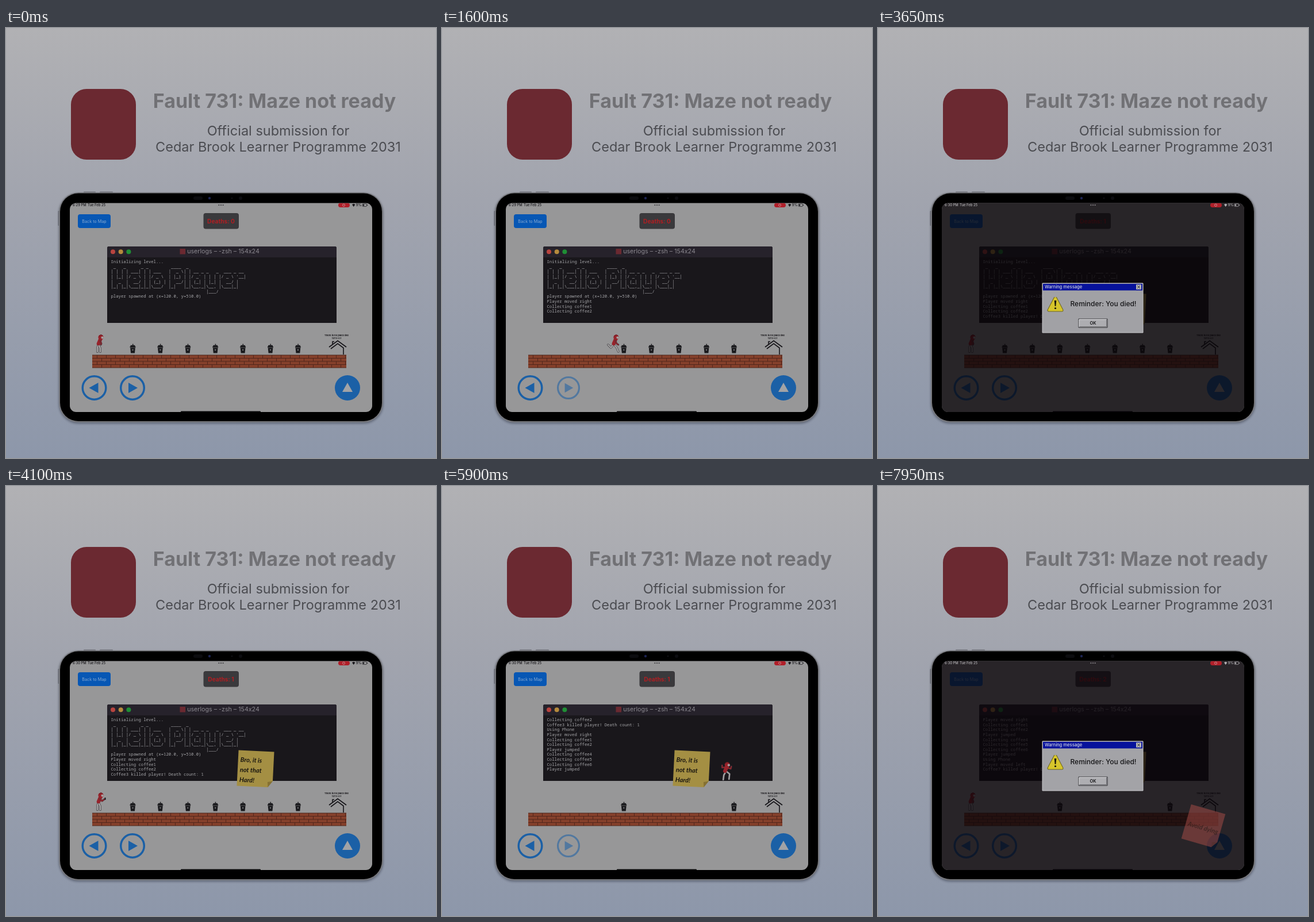
These frames come from a looping animation (748 by 748 pixels, 8000 ms). An HTML page with a canvas:

```html
<!DOCTYPE html>
<html lang="en">
<head>
<meta charset="utf-8">
<style>
html, body { margin: 0; width: 100%; height: 100%; overflow: hidden; background: #a0a3ae; }
canvas { display: block; }
</style>
</head>
<body>
<canvas id="stage" width="748" height="748"></canvas>
<script>
const c = document.getElementById('stage').getContext('2d');
const LOOP = 8000, START_X = 163, SPEED = 0.186, GROUND = 565;
const SANS = 'Inter, Roboto, sans-serif', MONO = '"Noto Sans Mono", "DejaVu Sans Mono", monospace';
const BLUE = '#1b60a6', INK = '#161519';

// [time, line]
const LOG = [
  [0, 'Initializing level...'],
  [0, ' _   _      _ _         ____  _'],
  [0, '| | | | ___| | | ___   |  _ \\| | __ _ _   _  ___ _ __'],
  [0, "| |_| |/ _ \\ | |/ _ \\  | |_) | |/ _` | | | |/ _ \\ '__|"],
  [0, '|  _  |  __/ | | (_) | |  __/| | (_| | |_| |  __/ |'],
  [0, '|_| |_|\\___|_|_|\\___/  |_|   |_|\\__,_|\\__, |\\___|_|'],
  [0, '                                      |___/'],
  [0, 'player spawned at (x=120.0, y=510.0)'],
  [900, 'Player moved right'],
  [1150, 'Collecting coffee1'],
  [1400, 'Collecting coffee2'],
  [1680, 'Coffee3 killed player! Death count: 1'],
  [4150, 'Using Phone'],
  [4850, 'Player moved right'],
  [4900, 'Collecting coffee1'],
  [4950, 'Collecting coffee2'],
  [5000, 'Player jumped'],
  [5200, 'Collecting coffee4'],
  [5450, 'Collecting coffee5'],
  [5700, 'Collecting coffee6'],
  [5800, 'Player jumped'],
  [6680, 'Using Phone'],
  [6930, 'Player moved left'],
  [7160, 'Coffee7 killed player! Death count: 2']
];

const between = (t, a, b) => t >= a && t < b;
const ramp = (t, a, b) => Math.min(1, Math.max(0, (t - a) / (b - a)));

function box(x, y, w, h, r, fill, stroke, lw = 1) {
  c.beginPath();
  c.roundRect(x, y, w, h, r);
  if (fill) { c.fillStyle = fill; c.fill(); }
  if (stroke) { c.strokeStyle = stroke; c.lineWidth = lw; c.stroke(); }
}
function disc(x, y, r, fill) {
  c.beginPath();
  c.arc(x, y, r, 0, 7);
  c.fillStyle = fill;
  c.fill();
}
function poly(points, fill) {
  c.beginPath();
  points.forEach(p => c.lineTo(...p));
  c.closePath();
  c.fillStyle = fill;
  c.fill();
}
function line(points, color, lw) {
  c.beginPath();
  points.forEach(p => c.lineTo(...p));
  c.strokeStyle = color;
  c.lineWidth = lw;
  c.stroke();
}
function text(s, x, y, font, color, align = 'center') {
  c.font = font;
  c.fillStyle = color;
  c.textAlign = align;
  c.fillText(s, x, y);
}
function at(x, y, angle, scale, draw) {
  c.save();
  c.translate(x, y);
  c.rotate(angle);
  c.scale(scale, Math.abs(scale));
  draw();
  c.restore();
}

function backdrop() {
  const g = c.createLinearGradient(0, 0, 0, 748);
  g.addColorStop(0, '#b1b1b4');
  g.addColorStop(0.4, '#a1a4ae');
  g.addColorStop(1, '#8d97aa');
  c.fillStyle = g;
  c.fillRect(0, 0, 748, 748);
  box(113, 106, 113, 123, 27, '#6b2931');
  text('Fault 731: Maze not ready', 467, 139, `700 34px ${SANS}`, '#717175');
  text('Official submission for', 473.5, 187, `400 23.5px ${SANS}`, '#4b4c51');
  text('Cedar Brook Learner Programme 2031', 473.5, 215, `400 23.5px ${SANS}`, '#4b4c51');
}

function tablet() {
  box(135, 284.5, 21, 3, 1, '#75777e');
  box(163, 284.5, 23, 3, 1, '#75777e');
  box(90.5, 318, 3, 26, 1, '#75777e');
  c.save();
  c.shadowColor = 'rgba(40,45,60,.5)';
  c.shadowBlur = 4;
  c.shadowOffsetY = 2;
  box(92, 286, 564, 400, 34, '#77787d');
  c.restore();
  box(94, 287.5, 560, 396.5, 32, '#000');
  box(326, 293, 16, 6, 3, '#0c0c0f');
  disc(354, 296, 2.2, '#1c2352');
  disc(393, 296, 1.3, '#121217');
  disc(408, 296, 3, '#0c0c10');
}

function terminal(t) {
  box(176, 380, 399, 133, [3, 3, 0, 0], '#19171b');
  box(176, 380, 399, 19, [3, 3, 0, 0], '#26222b');
  ['#b8443f', '#b58a3c', '#1f8f35'].forEach((color, i) => disc(186 + 13.7 * i, 389.3, 4, color));
  box(302.5, 384, 9.5, 9.5, 0, '#6b2931');
  text('userlogs – -zsh – 154x24', 378, 392, `400 10.7px ${SANS}`, '#8b888f');
  const n = LOG.filter(l => t >= l[0]).length;
  const top = n < 14 ? Math.max(0, n - 12) : n - 11;
  LOG.slice(top, n).forEach((l, i) =>
    text(l[1], 182.5, 409 + 8.63 * i, `400 7.27px ${MONO}`, '#a6a6a9', 'left'));
}

function wall() {
  c.fillStyle = '#85402b';
  c.fillRect(150, 569, 442, 22);
  c.fillStyle = '#4c241b';
  c.fillRect(150, 568.5, 442, 1);
  for (let row = 0; row < 4; row++) {
    const y = 569 + row * 5.5;
    c.fillRect(150, y + 5, 442, 0.9);
    for (let x = 158 + (row % 2) * 8; x < 592; x += 16) c.fillRect(x, y, 0.9, 5.5);
  }
}

function house() {
  text('There is no place like', 575, 536.3, `700 4.1px ${SANS}`, INK);
  text('127.0.0.1', 575, 541, `700 4px ${SANS}`, INK);
  line([[562, 555], [577, 544], [592, 555]], INK, 1.8);
  line([[565, 558], [577, 549], [587, 556.5], [587, 568]], INK, 1.6);
  line([[568, 550], [568, 545.5], [571, 545.5]], INK, 1.6);
}

function coffee(x) {
  c.fillStyle = '#1a1a1d';
  c.fillRect(x - 0.5, 549.5, 1.4, 3);
  box(x - 4, 551.8, 8, 2.5, 1, '#1a1a1d');
  box(x - 5, 553.8, 10, 2, 0.6, '#1a1a1d');
  poly([[x - 4.4, 556.3], [x + 4.4, 556.3], [x + 3.4, 565.5], [x - 3.4, 565.5]], '#1a1a1d');
  disc(x, 560, 1.2, '#77777a');
}

function limb(points, color, lw) {
  line(points, '#37343a', lw + 1.2);
  line(points, color, lw);
}

function player(x, y, pose, t, dir) {
  const red = '#97232b', pale = '#a5a3a3';
  const s = Math.sin((t - 1500) / 400 * 2 * Math.PI);
  const leg = k => [[-2, -15], [-2 - 5 * k, -9], [-3 - 9 * k, -2 - Math.max(0, 12 * k)]];
  at(x, y, 0, dir, () => {
    c.lineCap = c.lineJoin = 'round';
    if (pose === 'run') {
      limb(leg(s), pale, 2.2);
      limb(leg(-s), pale, 2.2);
    } else if (pose === 'jump') {
      limb([[0, -16], [-4, -9], [-5, -1]], pale, 2.4);
      limb([[1, -15], [6, -11], [5, -2]], pale, 2.4);
      limb([[0, -23], [-7, -22], [-7, -26]], red, 1.8);
      limb([[2, -22], [8, -20], [9, -24]], red, 1.8);
    } else {
      limb([[-3, -14], [-4, -7], [-4, -2]], pale, 2.6);
      limb([[-2, -14], [1, -8], [1, -2]], pale, 2.6);
    }
    line([[1, -23], [-2, -16]], red, 6.5);
    if (pose === 'phone') {
      limb([[0, -21], [4, -17], [8, -20]], red, 1.8);
      box(8.5, -23, 2, 4, 0.5, INK);
    } else if (pose !== 'jump') {
      limb([[1, -21], [3, -16], [pose === 'run' ? 6 : 2, -14]], red, 1.6);
    }
    disc(2, -27, 4.6, red);
    disc(4.6, -26.4, 2.1, pale);
    line([[-1, -29], [2, -31.5], [5, -30]], '#5a151b', 0.8);
    c.lineCap = 'butt';
    c.lineJoin = 'miter';
  });
}

function note(x, y, angle, fill, lines, size) {
  at(x, y, angle, 1, () => {
    poly([[-31, -31], [31, -31], [31, 20], [23, 31], [-31, 31]], fill);
    poly([[31, 20], [23, 31], [22, 22]], 'rgba(60,40,10,.3)');
    lines.forEach((s, i) =>
      text(s, -27, -11 + 17.5 * i, `italic 700 ${size}px Lato, ${SANS}`, '#17140f', 'left'));
  });
}

function control(x, angle, filled, pressed) {
  c.save();
  c.globalAlpha = pressed ? 0.55 : 1;
  at(x, 626, 0, pressed ? 0.91 : 1, () => {
    if (filled) disc(0, 0, 22, BLUE);
    else {
      c.beginPath();
      c.arc(0, 0, 20.3, 0, 7);
      c.strokeStyle = BLUE;
      c.lineWidth = 3.5;
      c.stroke();
    }
    c.rotate(angle);
    poly([[9, 0], [-7, -9], [-7, 9]], filled ? '#a2a3a6' : BLUE);
  });
  c.restore();
}

function status(t, dim) {
  const color = dim > 0.5 ? '#b5b3b6' : INK;
  text(t < 3650 ? '6:29 PM' : '6:30 PM', 116, 310.3, `500 5.9px ${SANS}`, color, 'left');
  text('Tue Feb 25', 142, 310.3, `500 5.9px ${SANS}`, color, 'left');
  for (let i = -1; i < 2; i++) disc(374 + i * 3.6, 308, 1.1, dim > 0.5 ? '#8b888d' : '#3c3b3f');
  box(578, 304.5, 20, 7.5, 3.7, '#b01f29');
  c.beginPath();
  c.arc(587.5, 308.2, 2, 0, 7);
  c.strokeStyle = '#c9a9ab';
  c.lineWidth = 0.8;
  c.stroke();
  poly([[602, 307], [604.7, 305.7], [607.4, 307], [604.7, 311]], color);
  text('9%', 613.5, 310.3, `500 6px ${SANS}`, color);
  box(620, 305.8, 7.5, 4.6, 1.2, null, color, 0.7);
  c.fillStyle = color;
  c.fillRect(621, 306.8, 2, 2.6);
  c.fillRect(628.3, 307.2, 0.8, 1.8);
}

function popup() {
  box(286, 444, 175, 86, 0, '#a3a3a7', '#c9c9cc');
  c.fillStyle = '#07129c';
  c.fillRect(287, 445, 173, 11.5);
  text('Warning message', 290, 453.4, `500 7.6px ${SANS}`, '#d5d6e2', 'left');
  box(449, 446.2, 9, 8.5, 0, '#b5b5b8');
  line([[451.3, 448.2], [455.7, 452.8]], '#111', 1);
  line([[455.7, 448.2], [451.3, 452.8]], '#111', 1);
  c.lineJoin = 'round';
  line([[308.5, 469], [297, 491], [320, 491], [308.5, 469]], '#6d651d', 5);
  poly([[308.5, 468], [296, 492], [321, 492]], '#d6c52b');
  line([[308.5, 469], [297, 491], [320, 491], [308.5, 469]], '#d6c52b', 3);
  c.lineJoin = 'miter';
  poly([[306.7, 474], [310.3, 474], [309.3, 484], [307.7, 484]], '#16140a');
  disc(308.5, 487.5, 1.6, '#16140a');
  text('Reminder: You died!', 392, 484, `500 12px ${SANS}`, '#141416');
  box(349, 506, 50, 15, 0, '#aeaeb2', '#2c2c30');
  line([[350, 520], [350, 507], [398, 507]], '#dcdcdf', 1);
  line([[350.5, 519.6], [397.6, 519.6], [397.6, 507]], '#6b6b70', 1);
  text('OK', 374, 516.2, `600 7.5px ${SANS}`, '#141416');
}

function pose(t) {
  let x = START_X, kind = 'idle', dir = 1, lift = 0;
  const right = between(t, 860, 1670) || between(t, 4120, 6220);
  const left = between(t, 6900, 7130);
  if (right) x += (t - (t < 4000 ? 860 : 4120)) * SPEED;
  else if (between(t, 6220, 7130)) x = 553.6 - Math.max(0, t - 6900) * SPEED;
  if (right || left) kind = 'run';
  else if (between(t, 4000, 4120) || between(t, 6500, 6900)) kind = 'phone';
  if (left) dir = -1;
  for (const start of [4714, 5700]) {
    const u = (t - start) / 520;
    if (u > 0 && u < 1) {
      lift = 56 * 4 * u * (1 - u);
      kind = 'jump';
    }
  }
  return { x, kind, dir, lift, right, left };
}

function taken(i, t) {
  if (i === 2 || i === 6) return false;
  const reach = (208 + 48 * i - START_X) / SPEED;
  return t < 3650 ? i < 2 && t > 860 + reach : t > 4120 + reach;
}

function draw(t) {
  const p = pose(t);
  const dim = t < 5000 ? ramp(t, 1660, 1860) * (1 - ramp(t, 3650, 3800)) : ramp(t, 7150, 7400);
  const deaths = t < 1680 ? 0 : t < 7150 ? 1 : 2;

  backdrop();
  tablet();
  c.save();
  box(111, 304.5, 526, 363.5, 11, '#979798');
  c.clip();

  box(125, 324, 57, 24, 4, '#0757b4');
  text('Back to Map', 153.5, 338.6, `400 7.2px ${SANS}`, '#8aabd2');
  box(343.5, 322, 61.5, 27.5, 4, '#3a393c');
  text('Deaths: ' + deaths, 374, 339.6, `700 10.2px ${SANS}`, '#b11e22');
  terminal(t);
  wall();
  house();
  for (let i = 0; i < 7; i++) if (!taken(i, t)) coffee(220.5 + 47.9 * i);
  c.globalAlpha = ramp(t, 1900, 2200);
  note(434, 492, 0.05, '#a48f43', ['Bro, it is', 'not that', 'Hard!'], 11);
  c.globalAlpha = 1;
  player(p.x, GROUND - p.lift, p.kind, t, p.dir);
  control(153.5, Math.PI, false, p.left);
  control(220, 0, false, p.right);
  control(594, -Math.PI / 2, true, between(t, 4700, 4860) || between(t, 5690, 5850));
  box(304, 666.4, 139, 3, 1, '#0b0b0c');

  if (dim) {
    c.fillStyle = `rgba(9,4,9,${0.78 * dim})`;
    c.fillRect(111, 304, 526, 364);
  }
  c.globalAlpha = 0.5 * ramp(t, 7500, 7800);
  note(566, 592, 0.28, '#ab4f48', ['', 'Avoid dying'], 11);
  c.globalAlpha = dim;
  if (dim) popup();
  c.globalAlpha = 1;
  status(t, dim);
  c.restore();
}

function frame() {
  draw(performance.now() % LOOP);
  requestAnimationFrame(frame);
}
frame();
</script>
</body>
</html>
```
